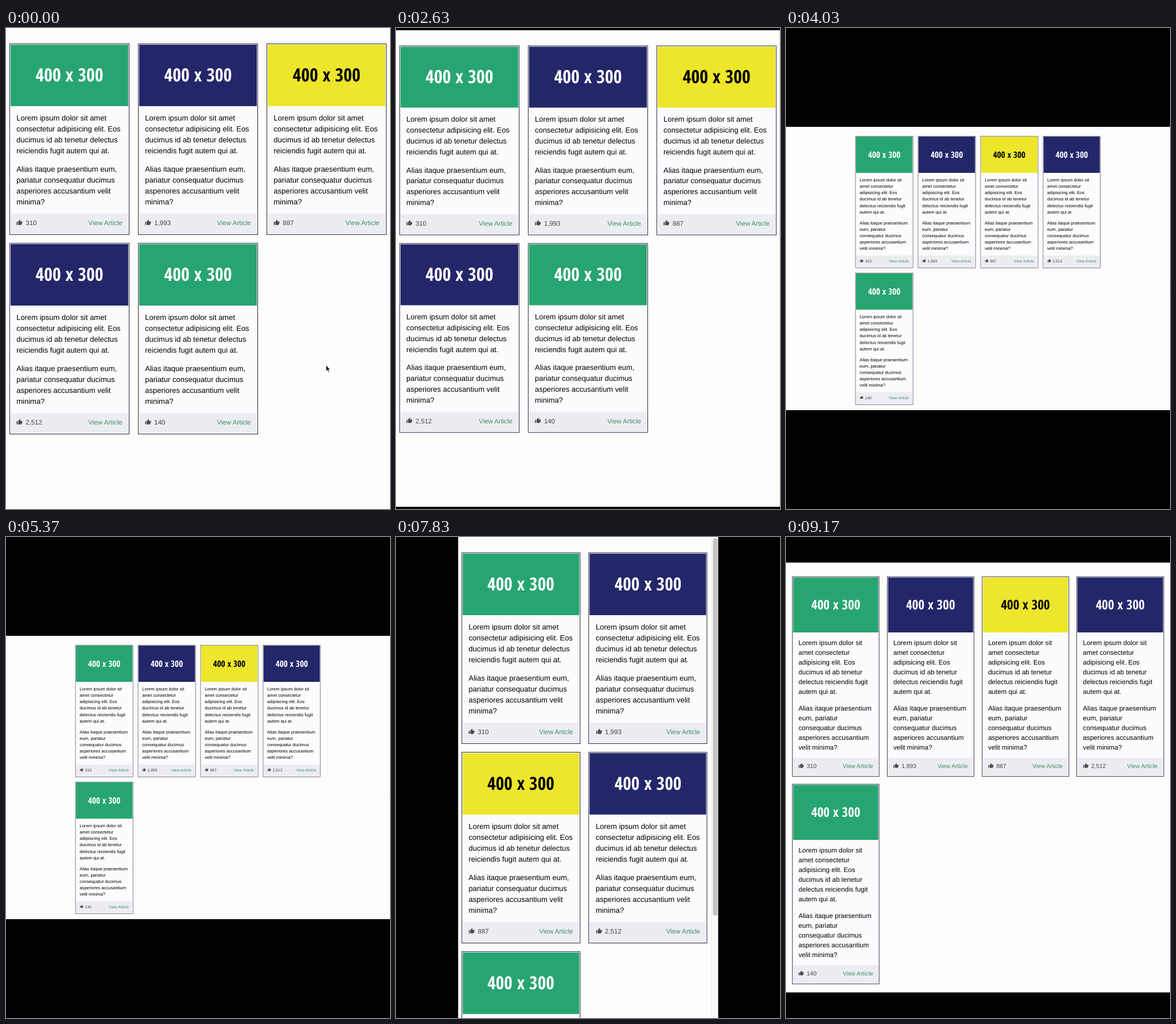
An HTML page that plays this animation: 669 by 837 pixels, repeating every 9.21 s.

```html
<!DOCTYPE html>
<html lang="en">
<head>
<meta charset="utf-8">
<title>Responsive card grid</title>
<style>
  html, body { margin: 0; width: 100%; height: 100%; overflow: hidden; background: #000; }
  #stage { position: relative; width: 669px; height: 837px; overflow: hidden; background: #000; }
  #page {
    position: absolute; left: 0; top: 0; height: 837px; overflow: hidden;
    transform-origin: 0 0; background: #fdfdfc;
    font: 13px/19px "Liberation Sans", Arial, sans-serif;
    text-rendering: geometricPrecision; color: #000;
  }
  #grid { position: absolute; top: 27.3px; display: grid; gap: 14.5px; }
  .card { box-sizing: border-box; border: 1px solid #26263c; padding: 1px; background: #fcfcfe; min-width: 0; }
  .pic {
    container-type: inline-size; height: 107px; overflow: hidden;
    display: flex; align-items: center; justify-content: center;
    color: #fff;
  }
  .pic span {
    font-family: "Liberation Sans Narrow", "Open Sans Condensed", "Open Sans", sans-serif;
    font-weight: 700; font-stretch: 75%; line-height: 1; white-space: nowrap;
    font-size: calc(var(--fit, 13) * 1cqw); padding-bottom: 2px;
  }
  .green { background: #27a570; }
  .navy { background: #24266a; }
  .yellow { background: #ede62b; color: #000; }
  .text { padding: 10.5px 8px 10.5px 10.5px; }
  p { margin: 0; }
  p + p { margin-top: 13.5px; }
  .foot {
    display: flex; align-items: center; height: 35px; padding: 0 10.5px;
    background: #ecedf2; font-size: 11.5px; color: #444;
  }
  .foot svg { width: 11px; height: 11px; margin: -3px 5px 0 0; fill: #4a4a4a; }
  .foot b { margin-left: auto; font-weight: 400; color: #3f9166; }
  #bar { position: absolute; right: 0; top: 0; width: 12px; height: 100%; background: #fafafa; border-left: 1px solid #ececec; box-sizing: border-box; }
  #bar i { position: absolute; left: 2px; top: 2px; width: 8px; height: 657px; border-radius: 4px; background: #c2c2c4; }
  #cursor { position: absolute; left: 0; top: 0; width: 10px; height: 15px; }
</style>
</head>
<body>
<div id="stage">
  <div id="page">
    <div id="grid"></div>
    <div id="bar"><i></i></div>
  </div>
  <svg id="cursor" viewBox="0 0 10 15"><path d="M.6.8V11.4L3 9.2 4.7 13.2 6.4 12.5 4.7 8.6H8Z" fill="#111" stroke="#fff" stroke-width=".8"/></svg>
</div>
<script>
  const STAGE_W = 669, STAGE_H = 837, LOOP = 9210;
  const GAP = 14.5, MARGIN = 11.5, MAX = 725, MIN_COL = 163, BAR = 12.5;
  const $ = id => document.getElementById(id);
  const page = $('page'), grid = $('grid'), bar = $('bar'), cursor = $('cursor');

  const thumb = '<svg viewBox="0 0 24 24"><path d="M1 21h4V9H1zM23 10a2 2 0 0 0-2-2h-6.3l1-4.9-.4-1.1L14.2 1 7.6 7.6A2 2 0 0 0 7 9v10a2 2 0 0 0 2 2h9a2 2 0 0 0 1.8-1.2l3-7A2 2 0 0 0 23 12z"/></svg>';
  const cards = [['green', '310'], ['navy', '1,993'], ['yellow', '887'], ['navy', '2,512'], ['green', '140']];
  grid.innerHTML = cards.map(([color, likes]) => `
    <div class="card">
      <div class="pic ${color}"><span>400 x 300</span></div>
      <div class="text">
        <p>Lorem ipsum dolor sit amet consectetur adipisicing elit. Eos ducimus id ab tenetur delectus reiciendis fugit autem qui at.</p>
        <p>Alias itaque praesentium eum, pariatur consequatur ducimus asperiores accusantium velit minima?</p>
      </div>
      <div class="foot">${thumb}${likes}<b>View Article</b></div>
    </div>`).join('');

  // start, end, from, to
  const drags = [[2612, 2892, 669, 1135.8], [5700, 6180, 1135.8, 452.5], [7900, 8300, 452.5, 748.6]];

  function ease(t, start, end) {
    const p = Math.min(1, Math.max(0, (t - start) / (end - start)));
    return p * p * (3 - 2 * p);
  }

  function windowWidth(t) {
    return drags.reduce((w, [start, end, from, to]) => w + (to - from) * ease(t, start, end), STAGE_W);
  }

  function layout(w) {
    const columns = room => Math.floor((Math.min(room - MARGIN, MAX) + GAP) / (MIN_COL + GAP));
    const scrolls = columns(w) < 3;
    const room = scrolls ? w - BAR : w;
    const inner = Math.min(room - MARGIN, MAX);
    const scale = Math.min(1, STAGE_W / w);
    page.style.width = w + 'px';
    page.style.transform = `translate(${(STAGE_W - w * scale) / 2}px, ${STAGE_H * (1 - scale) / 2}px) scale(${scale})`;
    grid.style.width = inner + 'px';
    grid.style.left = (room - inner) / 2 + 'px';
    grid.style.gridTemplateColumns = `repeat(${columns(room)}, 1fr)`;
    bar.style.display = scrolls ? 'block' : 'none';
  }

  function draw(t) {
    layout(windowWidth(t));
    const reach = ease(t, 900, 1600);
    const x = 557 + 111 * reach, y = 586 - 122 * reach - 20 * ease(t, 2612, 2892);
    cursor.style.transform = `translate(${x}px, ${y}px)`;
    cursor.style.visibility = t < 5700 ? 'visible' : 'hidden';
  }

  // picture captions span a fixed share of the picture
  draw(0);
  const label = grid.querySelector('.pic span');
  grid.style.setProperty('--fit', 13 * 0.573 * label.parentNode.offsetWidth / label.offsetWidth);

  const begin = performance.now();
  (function tick() {
    draw((performance.now() - begin) % LOOP);
    requestAnimationFrame(tick);
  })();
</script>
</body>
</html>
```
